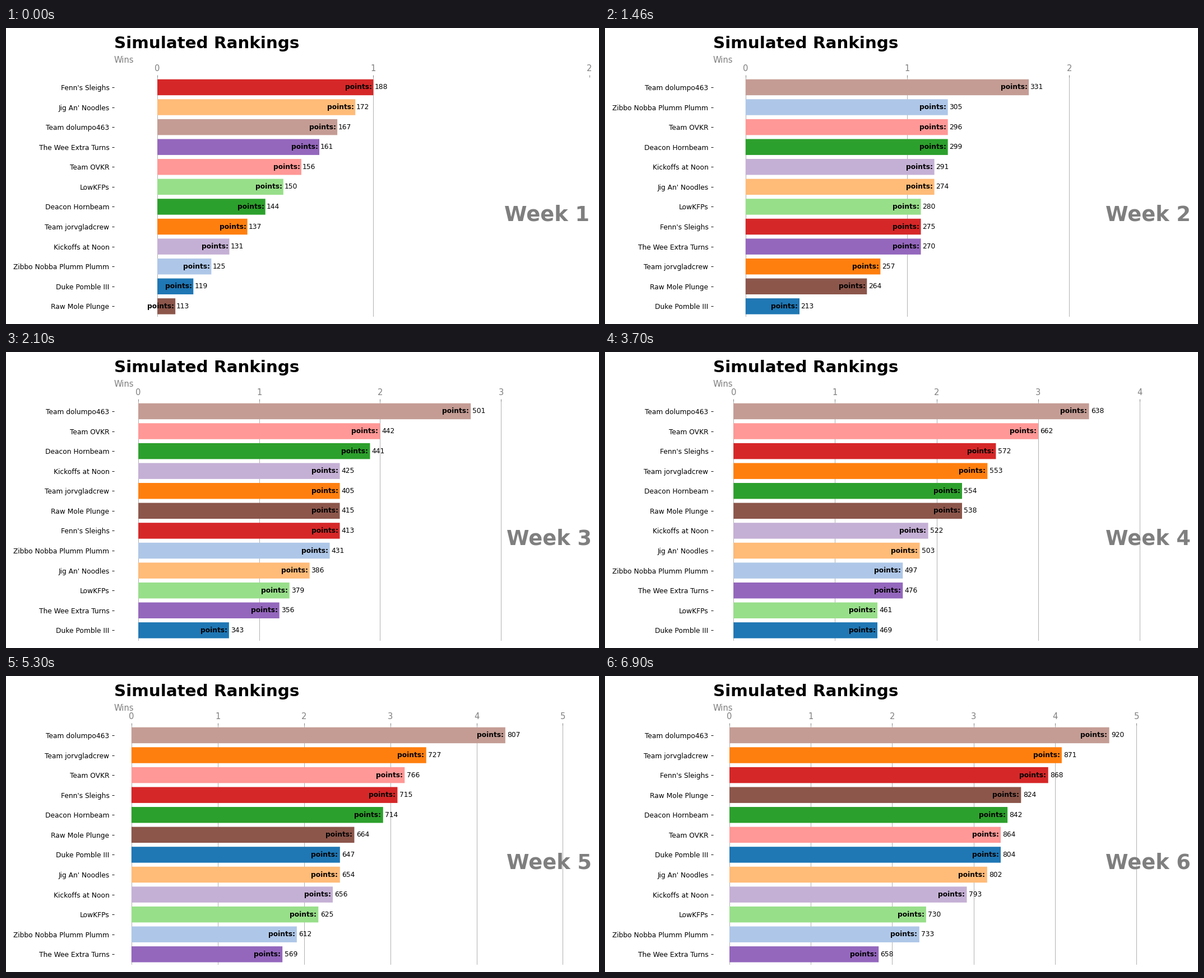
A matplotlib script for the animation above (8000 ms loop, 1058x529 px).

```python
import matplotlib.pyplot as plt
import numpy as np
from matplotlib.animation import FuncAnimation

W, H = 1058, 529
LEFT, RIGHT, TOP, BOTTOM = 193.0, 1044.8, 87.5, 515.8  # plot area in pixels
GRAY = "#7f7f7f"
PALETTE = plt.get_cmap("tab20").colors

plt.rcParams["font.family"] = "DejaVu Sans"

# Name and palette index; teams with equal wins keep this order.
TEAMS = {
    "H": ("Team dolumpo463", 11),
    "F": ("Kickoffs at Noon", 9),
    "R": ("Team jorvgladcrew", 2),
    "W": ("Zibbo Nobba Plumm Plumm", 1),
    "A": ("Team OVKR", 7),
    "S": ("Deacon Hornbeam", 4),
    "D": ("Raw Mole Plunge", 10),
    "B": ("LowKFPs", 5),
    "O": ("Fenn's Sleighs", 6),
    "L": ("The Wee Extra Turns", 8),
    "K": ("Duke Pomble III", 0),
    "T": ("Jig An' Noodles", 3),
}

# Each week: teams from best to worst, and scores at a few of the ranks.
KEY_RANKS = [1, 2, 5, 9, 12]
WEEKS = [
    ("OTHLABSRFWKD", [188, 172, 156, 131, 113]),
    ("WHFSDABRLTKO", [180, 164, 151, 109, 87]),
    ("HDRASOFKWTBL", [170, 151, 142, 126, 86]),
    ("AORHKDLTSFBW", [221, 159, 126, 113, 66]),
    ("KRHBSTOFDWAL", [178, 174, 160, 126, 93]),
    ("DKOTRFSWHBAL", [160, 157, 144, 113, 89]),
]


def standings():
    """Yield the running (team, wins, points) rows after each week."""
    twelfths = dict.fromkeys(TEAMS, 0)
    points = dict.fromkeys(TEAMS, 0)
    for ranking, key_scores in WEEKS:
        for rank, team in enumerate(ranking, 1):
            # A team wins against every team it outscores, and itself.
            twelfths[team] += 13 - rank
            points[team] += np.interp(rank, KEY_RANKS, key_scores)
        order = sorted(TEAMS, key=lambda t: -twelfths[t])
        yield [(t, twelfths[t] / 12, round(points[t])) for t in order]


fig = plt.figure(figsize=(12, 6), dpi=W / 12, facecolor="white")


def draw_week(week, table):
    """Build the hidden chart of one week."""
    names, colors = zip(*(TEAMS[team] for team, _, _ in table))
    wins = [win for _, win, _ in table]
    rows = range(len(table))
    top = wins[0]

    # A tick label at the very edge of the axis takes some room.
    right = RIGHT - 4.2 if top == int(top) else RIGHT
    ax = fig.add_axes([LEFT / W, 1 - BOTTOM / H,
                       (right - LEFT) / W, (BOTTOM - TOP) / H],
                      label=f"week {week}", visible=False)

    ax.barh(rows, wins, color=[PALETTE[c] for c in colors], snap=False)
    gap = top / 200
    for y, (_, win, score) in enumerate(table):
        ax.text(win - gap, y, "points:", size=10, weight=600,
                ha="right", va="center")
        ax.text(win + gap, y, str(score), size=10, ha="left", va="center")

    ax.set_xlim(-0.2, top + 1)
    ax.set_ylim(len(table) - 0.482, -0.518)
    ax.set_xticks(range(int(top + 1) + 1))
    ax.set_yticks(rows, names)
    ax.xaxis.set_ticks_position("top")
    ax.tick_params(axis="x", colors=GRAY, labelsize=12, pad=2.7)
    ax.grid(axis="x", linestyle="-")
    ax.set_axisbelow(True)
    ax.set_frame_on(False)

    place = dict(transform=ax.transAxes)
    ax.text(0, 1.12, "Simulated Rankings", size=24, weight=600, **place)
    ax.text(0, 1.06, "Wins", size=12, color=GRAY, **place)
    ax.text(1, 0.4, f"Week {week}", size=30, weight=800, color=GRAY,
            ha="right", **place)
    return ax


charts = [draw_week(week, table) for week, table in enumerate(standings(), 1)]


def update(n):
    # Each week lasts 16 steps; the loop starts 11 steps into the first.
    current = (n + 11) // 16
    for i, ax in enumerate(charts):
        ax.set_visible(i == current)
    return charts


anim = FuncAnimation(fig, update, frames=80, interval=100,
                     repeat=True, repeat_delay=0, blit=False)
plt.show()
```
